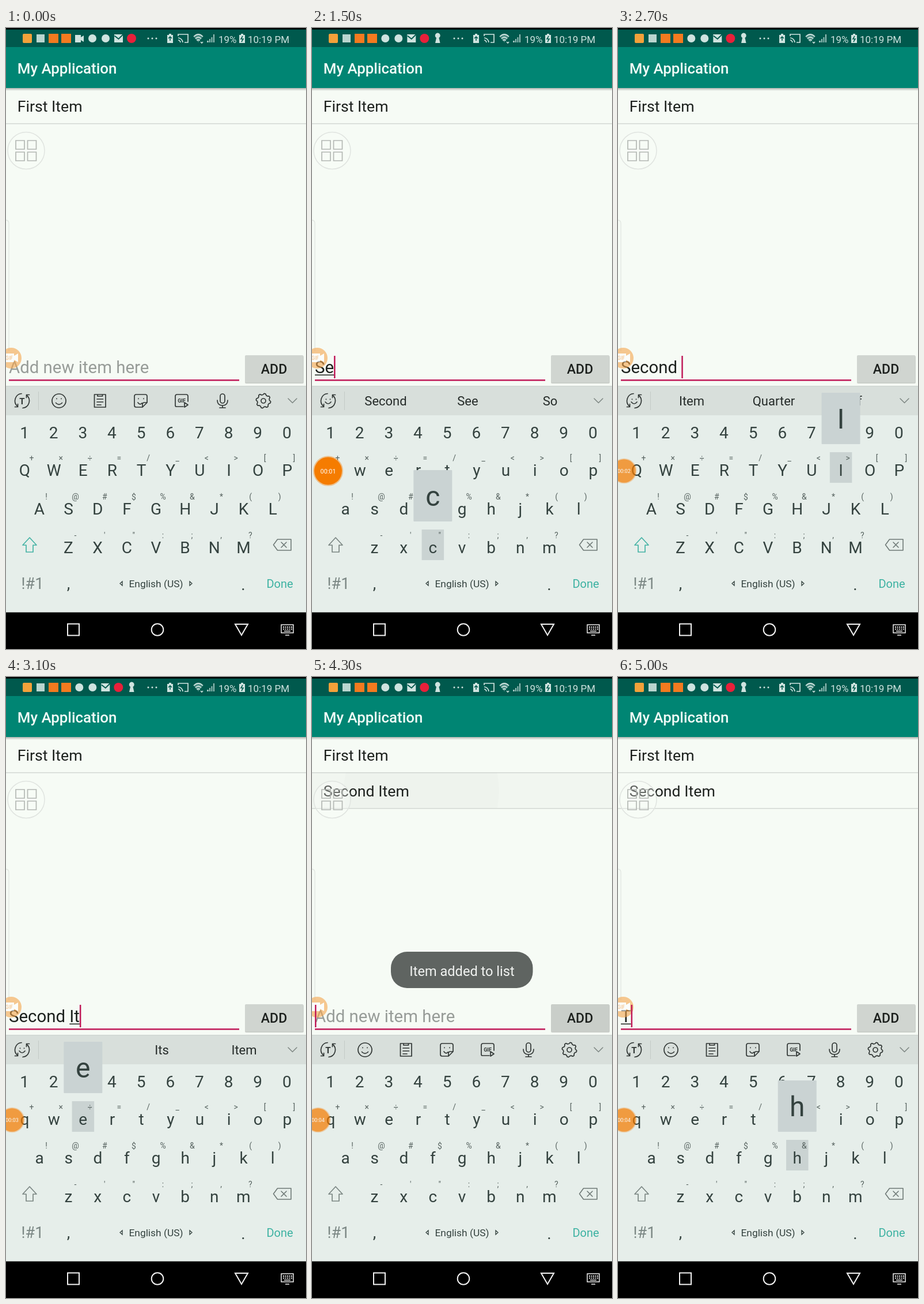
An HTML page that plays this animation: 521 px wide and 1076 px high, repeating every 5.1 s.

```html
<!DOCTYPE html>
<html lang="en">
<head>
<meta charset="utf-8">
<title>To-do list demo</title>
<style>
  html, body { margin: 0; width: 100%; height: 100%; overflow: hidden; background: #f6fbf5; }
  svg { display: block; width: 521px; height: 1076px; }
  text { font-family: Roboto, "Noto Sans", sans-serif; white-space: pre; }
  .mid { text-anchor: middle; }
  .line { fill: none; stroke: #303634; stroke-width: 1.7; stroke-linecap: round; stroke-linejoin: round; }
  .item { font-size: 26.7px; fill: #1c201d; }
  .key { font-size: 28px; fill: #34423f; }
  .hint { font-size: 14px; fill: #56625f; }
  .word { font-size: 22px; fill: #252b29; }
  .accent { fill: #c01a58; }
</style>
</head>
<body>
<svg viewBox="0 0 521 1076">
  <defs>
    <linearGradient id="shade" x2="0" y2="1">
      <stop stop-color="#000" stop-opacity=".28"/><stop offset="1" stop-color="#000" stop-opacity="0"/>
    </linearGradient>
    <clipPath id="row"><rect y="166" width="521" height="62"/></clipPath>
    <g id="turn" class="line">
      <path d="M-1 -12.500A12.500 12.500 0 0 0 -8 9.500M1 12.500A12.500 12.500 0 0 0 8 -9.500"/>
      <path d="M-12.500 10.500H-7.500V5.500M12.500 -10.500H7.500V-5.500"/>
    </g>
  </defs>

  <rect width="521" height="1076" fill="#f6fbf5"/>
  <rect y="104" width="521" height="5" fill="url(#shade)"/>
  <rect width="521" height="34" fill="#00594d"/>
  <rect width="521" height="2.600"/>
  <rect y="33" width="521" height="71" fill="#008573"/>
  <text x="19.8" y="79" font-size="25.9" font-weight="500" fill="#f1fbf7">My Application</text>

  <!-- status bar -->
  <rect x="29" y="10" width="16" height="16" rx="2" fill="#f4a13a"/>
  <rect x="53" y="11" width="14" height="14" fill="#b9d5cf"/>
  <rect x="74" y="10" width="17" height="16" fill="#f47a1f"/>
  <rect x="96" y="10" width="17" height="16" fill="#f47a1f"/>
  <path id="video" d="M120 12h10v4l5-3v11l-5-3v4h-10z" fill="#cfe3df"/>
  <g id="notes">
    <circle cx="150" cy="18" r="7" fill="#cfe3df"/><circle cx="173" cy="18" r="7" fill="#cfe3df"/>
    <path d="M188 11h15v14h-15z" fill="#cfe3df"/>
    <path d="M188.500 13.500l7 5.500 8-8" fill="none" stroke="#00594d" stroke-width="1.800"/>
    <circle cx="218" cy="18" r="8" fill="#e8203a"/>
  </g>
  <path id="pin" d="M214 26l2-9a4.500 4.500 0 1 1 4.500 0l2 9z" fill="#cfe3df"/>
  <g fill="#cfe3df">
    <circle cx="247" cy="18" r="1.500"/><circle cx="254" cy="18" r="1.500"/><circle cx="261" cy="18" r="1.500"/>
    <path d="M280 12h3v-2h4v2h3v14h-10z"/><path d="M405 12h3v-2h4v2h3v14h-10z"/>
    <path d="M349 25h3v-3h-3zM353 25h2v-6h-2zM356.500 25h2v-9h-2zM360 25h2v-14h-2z" opacity=".75"/>
    <path d="M326 15q8-8 16 0l-8 10z" opacity=".35"/>
    <text x="369" y="25.500" font-size="17">19%</text>
    <text x="420" y="25.500" font-size="17">10:19 PM</text>
  </g>
  <path d="M285 15v7M282 18l3-3 3 3M411 14l-3 5h4l-3 5" fill="none" stroke="#00594d" stroke-width="1.500"/>
  <g fill="none" stroke="#cfe3df" stroke-width="1.700">
    <path d="M299 14v-3h17v14h-6M299 17q7 1 8 8M299 21q3 0 4 4"/>
    <path d="M326 15q8-8 16 0M329 18.500q5-5 10 0M331.500 21.500q2.500-2 5 0M338 24l2 2 2-2"/>
  </g>

  <!-- list -->
  <text class="item" x="19.7" y="145">First Item</text>
  <rect y="165" width="521" height="1.500" fill="#d3d8d3"/>
  <g id="second">
    <g id="ripple" clip-path="url(#row)">
      <rect y="166" width="521" height="62" fill="#000" opacity=".018"/>
      <circle id="wave" cx="190" cy="197" fill="#000" opacity=".012"/>
    </g>
    <text class="item" x="19.7" y="207">Second Item</text>
    <rect y="227" width="521" height="1.500" fill="#d3d8d3"/>
  </g>
  <path d="M0 333q5 0 5 6V560" fill="none" stroke="#e1e6e1" stroke-width="1.300"/>
  <circle cx="35" cy="212.500" r="32" fill="#f8faf7" fill-opacity=".3" stroke="#e0e4e0" stroke-width="1.500"/>
  <path d="M17 195h15v15h-15zM37.500 195h15v15h-15zM17 215h15v15h-15zM37.500 215h15v15h-15z" fill="none" stroke="#b4b8b4" stroke-width="1.700"/>

  <!-- input row -->
  <text id="hint" x="5" y="598" font-size="29.4" fill="#979c98">Add new item here</text>
  <text id="typed" x="5" y="598" font-size="29.4" fill="#1c201d"></text>
  <rect id="compose" y="600.500" height="1.500" fill="#1c201d"/>
  <rect class="accent" x="5" y="609" width="400" height="2.500"/>
  <rect x="415" y="568" width="102" height="48" rx="2" fill="#000" opacity=".18"/>
  <rect id="add" x="415" y="567" width="101.500" height="47" rx="2" fill="#d0d5d0"/>
  <text class="mid" x="465.500" y="599" font-size="23" font-weight="500" fill="#1c201d">ADD</text>
  <g opacity=".6">
    <circle cx="9" cy="572" r="18" fill="#f5a54c"/>
    <path d="M-3 564h17v4l7-4v15l-7-4v4h-17z" fill="#fff"/>
    <text id="gif" class="mid" x="5.500" y="575" font-size="8.5" fill="#f08a24">GIF</text>
  </g>
  <rect id="caret" class="accent" y="568" width="2.500" height="39"/>
  <g id="toast">
    <rect x="137" y="476" width="246.500" height="63" rx="28" fill="#5f6461"/>
    <text class="mid" x="260.500" y="517.500" font-size="23.6" fill="#f1f3f1">Item added to list</text>
  </g>

  <!-- keyboard -->
  <rect y="620" width="521" height="51" fill="#d8dfdb"/>
  <rect y="620" width="521" height="1" fill="#cbd1cd"/>
  <rect y="671" width="521" height="342" fill="#e6eeea"/>
  <rect x="56" y="630" width="1" height="32" fill="#c3cac6"/>
  <path class="line" d="M490 642l7.500 7.500 7.500-7.500" style="stroke:#7d8682;stroke-width:1.500"/>
  <use href="#turn" x="28" y="646"/>
  <g id="tools">
    <text class="mid" x="28" y="651.500" font-size="15" font-weight="700" fill="#303634">T</text>
    <g class="line">
      <circle cx="92" cy="646" r="12"/><path d="M86.500 649.500q5.500 5.500 11 0M88 642v.500M96 642v.500"/>
      <path d="M153.500 635h19.500v22h-19.500zM159 635v3h8.500v-3M158 643h10.500M158 648h10.500M158 653h7"/>
      <path d="M226 635h16q3 0 3 3v11l-8 8h-11q-3 0-3-3v-16q0-3 3-3zM245 649h-5q-3 0-3 3v5M229 649q4 5 7 1M230 642v.500M239 642v.500"/>
      <path d="M308 656h-12q-2 0-2-2v-16q0-3 3-3h16q3 0 3 3v9M310 649v8l6-4z"/>
      <path d="M372 638a4 4 0 0 1 8 0v8a4 4 0 0 1-8 0zM367 645q0 9 9 9t9-9M376 654v4M371 658h10"/>
      <circle cx="447" cy="646" r="4"/><path id="gear"/>
    </g>
    <text class="mid" x="305" y="649" font-size="9" font-weight="700" fill="#303634">GIF</text>
  </g>
  <g id="words">
    <path class="line" d="M23 648q5 6 10 0M24.500 643v.500M31.500 643v.500"/>
    <text class="word mid" x="128" y="654"></text>
    <text class="word mid" x="270.500" y="654"></text>
    <text class="word mid" x="413.500" y="654"></text>
  </g>
  <rect id="down" fill="#cad3d2"/>
  <g id="keys"></g>
  <path id="shift" class="line" d="M41 883l12 13h-6v12h-12v-12h-6z"/>
  <path class="line" d="M464.500 895.500l7-9.500h23.500v19h-23.500zM478 891l9 9M487 891l-9 9" style="stroke:#6f7a77;stroke-width:1.600"/>
  <text class="mid" x="46" y="972" font-size="27" fill="#7b8784">!#1</text>
  <text class="key mid" x="108.500" y="972">,</text>
  <text class="key mid" x="412" y="974">.</text>
  <text class="mid" x="260.500" y="969" font-size="17.4" fill="#34423f">English (US)</text>
  <path d="M202 959v7l-4-3.500zM319 959v7l4-3.500z" fill="none" stroke="#34423f" stroke-width="1.300"/>
  <text class="mid" x="475.500" y="969.500" font-size="20" fill="#3db2a2">Done</text>
  <g id="popup">
    <rect width="67" height="89" rx="1" fill="#cad3d3"/>
    <text class="mid" x="33.500" y="62" font-size="48" fill="#34423f"></text>
  </g>
  <g id="timer">
    <circle r="24" fill="#f57c00" stroke="#f57c00" stroke-opacity=".4" stroke-width="4"/>
    <text class="mid" y="4" font-size="10.800" fill="#fff"></text>
  </g>

  <!-- navigation -->
  <rect y="1012.500" width="521" height="64"/>
  <g fill="none" stroke="#f2f2f2" stroke-width="2">
    <path d="M107 1032.500h20v20h-20zM398 1033h22l-11 19z"/><circle cx="263" cy="1042.500" r="10.300"/>
    <path d="M478 1034h21v14h-21z" stroke-width="1.500"/>
    <path d="M481 1038h16M481 1041.500h16" stroke-width="1.800" stroke-dasharray="2 1.500"/>
    <path d="M483 1045h11M485 1052h7" stroke-width="1.500"/>
  </g>
</svg>
<script>
const LOOP = 5100, STEP = 100;
const $ = id => document.getElementById(id);
const set = (el, attrs) => { for (const k in attrs) el.setAttribute(k, attrs[k]); };
const show = (el, on) => { el.style.display = on ? "" : "none"; };
const ramp = (t, a, b) => Math.min(1, Math.max(0, (t - a) / (b - a)));

// Keyboard rows: letters, hints, first column centre, top edge
const PITCH = 50.65, keys = {}, letters = [];
const rows = [
  ["1234567890", "", 32, 673],
  ["qwertyuiop", "+×÷=/_<>[]", 32.5, 735],
  ["asdfghjkl", "!@#$%&*()", 58, 802],
  ["zxcvbnm", "-'\":;,?", 108.5, 869]
];
function label(cls, x, y, s) {
  const el = document.createElementNS("http://www.w3.org/2000/svg", "text");
  set(el, { class: cls + " mid", x, y });
  el.textContent = s;
  return $("keys").appendChild(el);
}
rows.forEach(([chars, hints, x0, top], r) => [...chars].forEach((c, i) => {
  const x = x0 + i * PITCH;
  const el = label("key", x, r ? top + 40.5 : 710.5, c);
  if (!r) return;
  keys[c] = { x, top };
  letters.push([el, c]);
  label("hint", x + 12, top + 15, hints[i]);
}));

let gear = "";
for (let i = 0; i < 32; i++) {
  const a = (i + .5) * Math.PI / 16, r = i % 4 < 2 ? 12.8 : 10.6;
  gear += (i ? "L" : "M") + (447 + r * Math.cos(a)).toFixed(1) + " " + (646 + r * Math.sin(a)).toFixed(1);
}
set($("gear"), { d: gear + "z" });

// Each entry changes some fields of the typing state
const script = [
  [0, { text: "", press: "", caps: true, words: "" }],
  [700, { press: "s" }],
  [800, { text: "S", press: "", caps: false }],
  [1000, { press: "e", words: "So,She,See" }],
  [1200, { text: "Se", press: "", words: "Second,See,So" }],
  [1500, { press: "c" }],
  [1600, { text: "Sec", press: "o", words: "Second,Sec,Section" }],
  [1700, { text: "Seco", press: "", words: "Second,Seconds,Secondary" }],
  [1900, { press: "n" }],
  [2000, { text: "Secon", press: "" }],
  [2100, { press: "d" }],
  [2200, { text: "Second", press: "" }],
  [2400, { press: " " }],
  [2500, { text: "Second ", press: "", caps: true, words: "Item,Quarter,of" }],
  [2700, { press: "i" }],
  [2800, { text: "Second I", press: "", caps: false, words: "I,Is,In" }],
  [2900, { press: "t" }],
  [3000, { text: "Second It", press: "", words: "It,Its,Item" }],
  [3100, { press: "e" }],
  [3200, { text: "Second Ite", press: "", words: "Item,Items,Iterate" }],
  [3300, { press: "m" }],
  [3400, { text: "Second Item", press: "", words: "Items,Itemized,Item's" }],
  [3900, { text: "", words: "" }],
  [4400, { caps: true }],
  [4600, { press: "t" }],
  [4800, { text: "T", press: "", caps: false }],
  [5000, { press: "h" }]
];
function stateAt(t) {
  const s = { edited: 300 };
  for (const [at, change] of script) {
    if (at > t) break;
    Object.assign(s, change);
    if (at && "text" in change) s.edited = at;
  }
  return s;
}

function drawInput(t, s) {
  const typed = $("typed"), start = s.text.lastIndexOf(" ") + 1;
  typed.textContent = s.text;
  const end = s.text ? typed.getComputedTextLength() : 0;
  const from = start ? typed.getSubStringLength(0, start) : 0;
  set($("compose"), { x: 5 + from, width: Math.max(0, end - from) });
  set($("caret"), { x: 5 + end });
  const blink = t >= s.edited && (t - s.edited) % 1000 < 500;
  show($("caret"), blink);
  show($("hint"), !s.text);
  show($("gif"), s.text || !blink);
}

function drawKeys(s) {
  const cased = c => s.caps ? c.toUpperCase() : c;
  for (const [el, c] of letters) el.textContent = cased(c);
  $("shift").style.stroke = s.caps ? "#45b3a5" : "#7b8683";
  const words = s.words.split(",");
  show($("tools"), !s.words);
  show($("words"), s.words);
  $("words").querySelectorAll("text").forEach((el, i) => { el.textContent = words[i] || ""; });
  const k = keys[s.press];
  show($("down"), s.press);
  show($("popup"), k);
  if (k) {
    set($("down"), { x: k.x - 19.2, y: k.top, width: 38.5, height: 53 });
    set($("popup"), { transform: `translate(${k.x - 33.5} ${k.top - 103})` });
    $("popup").lastElementChild.textContent = cased(s.press);
  } else {
    set($("down"), { x: 143, y: 936, width: 235, height: 53 });
  }
}

function drawOverlays(t) {
  const live = t >= 100;
  show($("video"), !live);
  show($("pin"), live);
  set($("notes"), { transform: `translate(${live ? -22.7 : 0} 0)` });

  const dock = ramp(t, 2000, 2400), enter = ramp(t, 0, 300);
  set($("timer"), {
    transform: `translate(${28 - 17.5 * dock - 55 * (1 - enter)} 767.5) scale(${1 - .16 * dock})`,
    opacity: 1 - .28 * dock
  });
  $("timer").lastElementChild.textContent = "00:0" + Math.max(0, Math.floor((t - 100) / 1000));

  show($("second"), t >= 3900);
  set($("toast"), { opacity: ramp(t, 3800, 4200) * (1 - ramp(t, 4500, 4900)) });
  set($("ripple"), { opacity: ramp(t, 4000, 4200) * (1 - ramp(t, 4300, 4600)) });
  set($("wave"), { r: 135 * Math.max(0, (t - 4000) / 300) });
  const press = ramp(t, 3700, 3800) * (1 - ramp(t, 4200, 4600));
  set($("add"), { fill: `rgb(${208 - 10 * press},${213 - 10 * press},${208 - 9 * press})` });
}

function frame(now) {
  const t = Math.floor(now % LOOP / STEP) * STEP;
  const s = stateAt(t);
  drawInput(t, s);
  drawKeys(s);
  drawOverlays(t);
}
let began;
function tick(now) {
  began ??= now;
  frame(Math.max(0, now - began));
  requestAnimationFrame(tick);
}
frame(0);
requestAnimationFrame(tick);
</script>
</body>
</html>
```
